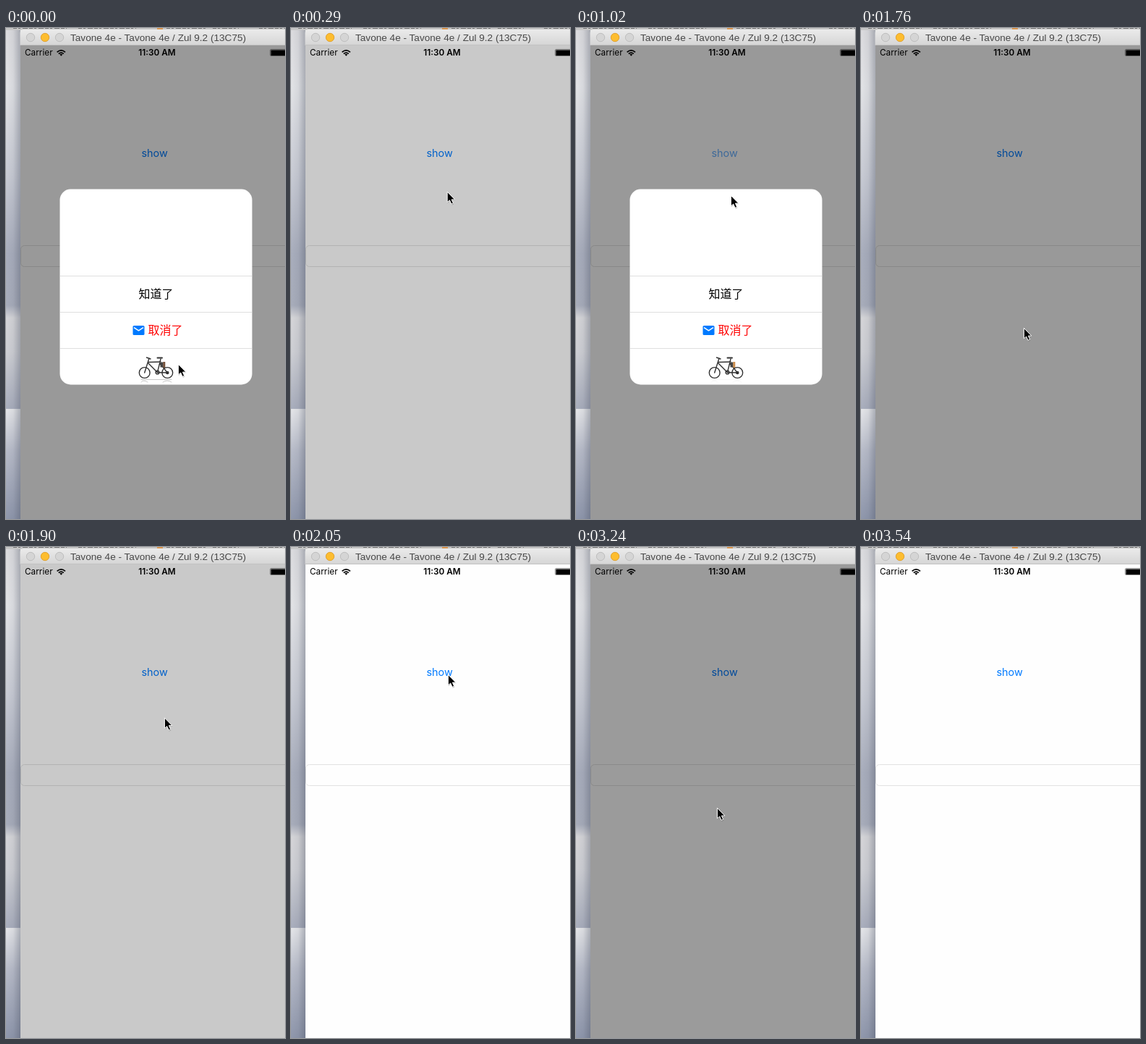
Animation of 386 by 678 pixels, one loop 4.29 s. Source, as an HTML page:

```html
<!DOCTYPE html>
<html lang="zh">
<head>
<meta charset="utf-8">
<title>Popup menu</title>
<style>
  html, body { margin: 0; width: 100%; height: 100%; overflow: hidden; background: #fff; }
  svg { display: block; width: 386px; height: 678px; }
  .ui { font-family: Inter, Roboto, sans-serif; }
  .title { font: 13.6px "Liberation Sans", Arial, sans-serif; fill: #484848; }
  .cjk { font: 16px "Noto Sans CJK SC", "Noto Sans CJK", sans-serif; }
  .mid { text-anchor: middle; }
</style>
</head>
<body>
<svg viewBox="0 0 386 678" xmlns="http://www.w3.org/2000/svg">
  <defs>
    <linearGradient id="snow" x1="0" y1="0" x2="0" y2="1">
      <stop offset="0" stop-color="#dcdcdf"/>
      <stop offset=".12" stop-color="#e3e4e7"/>
      <stop offset=".3" stop-color="#c9ccd5"/>
      <stop offset=".46" stop-color="#a9aebd"/>
      <stop offset=".565" stop-color="#a8adbb"/>
      <stop offset=".59" stop-color="#d6d6d9"/>
      <stop offset=".66" stop-color="#cfd0d5"/>
      <stop offset=".775" stop-color="#a9aebd"/>
      <stop offset=".776" stop-color="#e6e7ea"/>
      <stop offset=".86" stop-color="#b9bdca"/>
      <stop offset="1" stop-color="#8f97ac"/>
    </linearGradient>
    <linearGradient id="shade">
      <stop offset="0" stop-color="#444b5c" stop-opacity="0"/>
      <stop offset=".5" stop-color="#444b5c" stop-opacity=".08"/>
      <stop offset="1" stop-color="#444b5c" stop-opacity=".36"/>
    </linearGradient>
    <linearGradient id="bar" x1="0" y1="0" x2="0" y2="1">
      <stop offset="0" stop-color="#ebebeb"/>
      <stop offset="1" stop-color="#d5d5d5"/>
    </linearGradient>
  </defs>

  <!-- desktop -->
  <rect width="20" height="678" fill="url(#snow)"/>
  <rect width="20" height="678" fill="url(#shade)"/>
  <rect width="386" height="3" fill="#c6c6c6"/>
  <path d="M10 .5H84M100 .5H180M222 .5H276M286 .5H322M350 .5H386" stroke="#777" stroke-dasharray="5 2 3 3 7 2"/>
  <rect x="209" width="8" height="2" fill="#d99650"/>

  <!-- window -->
  <path d="M19.5 24V7Q19.5 2 24.5 2H386V24Z" fill="url(#bar)"/>
  <path d="M20 23.5H386" stroke="#c2c2c2"/>
  <g>
    <circle cx="34" cy="13" r="5.7" fill="#d5d5d5" stroke="#bebebe"/>
    <circle cx="54" cy="13" r="5.7" fill="#fdbd2f" stroke="#e0a231"/>
    <circle cx="74" cy="13" r="5.7" fill="#d5d5d5" stroke="#bebebe"/>
  </g>
  <text class="title" x="89" y="18">Tavone 4e - Tavone 4e / Zul 9.2 (13C75)</text>
  <rect x="20" y="24" width="366" height="654" fill="#fefefe"/>
  <text id="show" class="ui mid" x="205.6" y="178" font-size="14.4" fill="#007aff">show</text>
  <rect x="20.5" y="300.5" width="380" height="29" rx="5" fill="#fefefe" stroke="#e2e2e2"/>
  <rect id="veil" x="20" y="24" width="366" height="654"/>

  <!-- status bar -->
  <g class="ui" font-size="11.8">
    <text x="26" y="38.2">Carrier</text>
    <text class="mid" x="209" y="38.2" font-weight="600">11:30 AM</text>
  </g>
  <g fill="none" stroke="#000" stroke-width="1.7">
    <path d="M70.6 33.3Q76.3 28.3 82 33.3M72.8 35.6Q76.3 32.5 79.8 35.6"/>
    <path d="M74.3 36.6Q76.3 35 78.3 36.6L76.3 38.8Z" fill="#000" stroke="none"/>
  </g>
  <rect x="365.5" y="29.5" width="30" height="9" rx="1.5" fill="none" stroke="#000" stroke-opacity=".4"/>
  <rect x="366.5" y="30.5" width="28" height="7.5"/>

  <!-- popup -->
  <g id="card">
    <rect x="74.5" y="222.5" width="266" height="270" rx="15" fill="#fff"/>
    <path d="M75 342.5H340M75 392.5H340M75 442.5H340" stroke="#dfdfdf"/>
    <text id="know" class="cjk mid" x="207.6" y="373.4">知道了</text>
    <g id="cancel">
      <rect x="175.5" y="411" width="16" height="13" rx="1.6" fill="#007aff"/>
      <path d="M177 413.6L183.5 417.8L190 413.6" fill="none" stroke="#fff" stroke-width="1.5"/>
      <text class="cjk" x="196.6" y="423.4" fill="#f00">取消了</text>
    </g>
    <g fill="none" stroke="#333" stroke-width="1.4" stroke-linecap="round">
      <path id="ground" d="M187 485.5H229M187 489Q190 485 196 489M217 489Q223 485 229 489" stroke="#bbb" stroke-width=".8"/>
      <circle cx="191.7" cy="476" r="7.4"/>
      <circle cx="223.3" cy="476" r="7.4"/>
      <path d="M191.7 476L198 456M194.5 455L200 457M197 461.5L214 461M197 463L209.5 475.5L214 457M209.5 475.5L223.3 476L213 463"/>
      <path d="M209.5 455.5H216" stroke-width="2"/>
      <circle cx="209.5" cy="475.5" r="2.4"/>
      <circle cx="223.3" cy="476" r="1.6" fill="#333"/>
      <rect x="213.5" y="461.5" width="4" height="7" fill="#444" stroke="none"/>
      <rect id="bag" x="217.3" y="461" width="3" height="8" stroke="none"/>
    </g>
  </g>

  <g id="cursor">
    <path d="M1 2.5V16.5L4.5 13.5L7 19L9.7 18L7.5 12.5H12Z" opacity=".2"/>
    <path d="M.7 .7V15.2L4 12.3L6.4 17.6L9 16.5L6.7 11.4H11.2Z" stroke="#fff"/>
  </g>
</svg>
<script>
const LOOP = 4290, TICK = 147.5, LEAD = 18;  // the screen is sampled once per tick
const $ = id => document.getElementById(id);
const clamp = x => Math.min(1, Math.max(0, x));
const fade = (id, value) => $(id).setAttribute("opacity", value);

// Times below are in ticks: "show" is pressed and released, the popup opens, a row closes it.
const popups = [
  { open: -1, close: .9, row: "bike" },
  { press: 6, release: 6, open: 7, close: 11.9, row: "cancel" },
  { press: 16, release: 17, open: 17, close: 21.63, row: "know" }
];

// Pointer stops: tick, x, y
const stops = [
  [0, 238, 464], [3, 213, 196], [5, 198, 174], [6, 198, 174], [7, 214, 231],
  [9, 228, 416], [10, 225, 414], [12, 225, 414], [14, 217, 176],
  [16, 211, 164], [17, 211, 164], [19, 195, 353], [20, 195, 360]
];
const POINTER_GONE = 23;

function pointer(n) {
  const i = stops.findLastIndex(s => s[0] <= n);
  const a = stops[i], b = stops[i + 1] || a;
  const p = clamp((n - a[0]) / (b[0] - a[0] || 1));
  const ease = 1 - (1 - p) ** 2;
  return [1, 2].map(k => a[k] + (b[k] - a[k]) * ease - .3);
}

function draw(t) {
  const n = Math.floor((t + LEAD) / TICK);
  const { press, release, open, close, row } = popups.findLast(p => n >= (p.press ?? p.open));
  const pressed = id => id === row && n >= close - 1 && n < close;

  fade("show", press ? clamp(.2 + .4 * Math.max(0, n - release)) : 1);
  fade("veil", n < open ? 0 : .4 * (1 - clamp((n - close) / 1.4) ** 3));
  fade("card", n >= open && n < close ? 1 : 0);
  for (const id of ["know", "cancel"]) fade(id, pressed(id) ? .2 : 1);
  fade("ground", pressed("bike") ? 1 : .15);
  $("bag").setAttribute("fill", pressed("bike") ? "#75513a" : "#cc8d4c");

  $("cursor").setAttribute("transform", `translate(${pointer(n)})`);
  fade("cursor", n < POINTER_GONE ? 1 : 0);
}

const start = performance.now();
function tick() {
  draw((performance.now() - start) % LOOP);
  requestAnimationFrame(tick);
}
tick();
</script>
</body>
</html>
```
